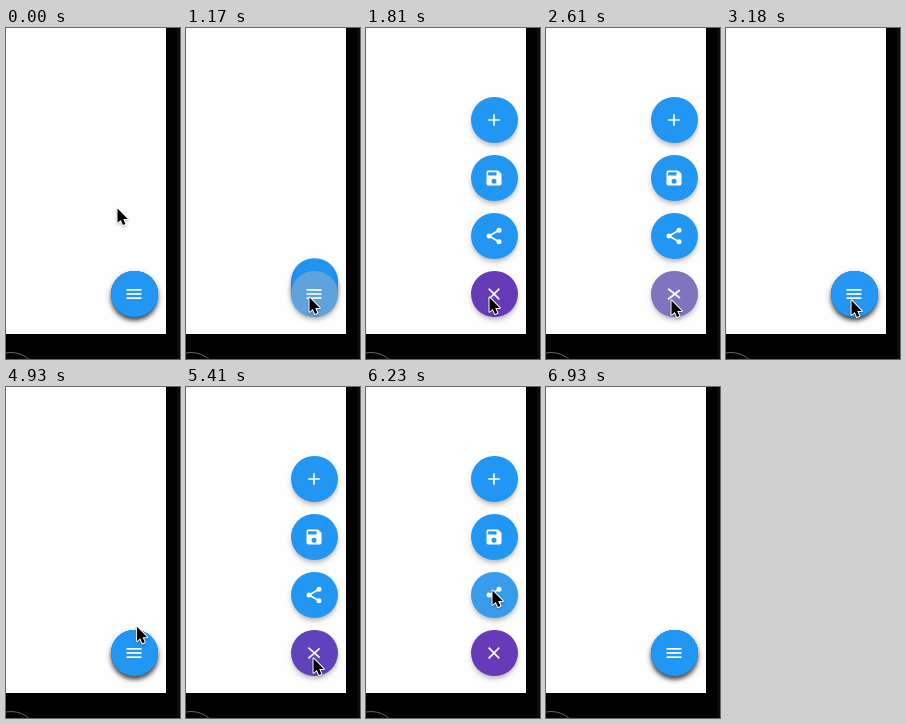
An HTML page for the animation above (7150 ms loop, 174 by 331 pixels).

```html
<!DOCTYPE html>
<html lang="en">
<head>
<meta charset="utf-8">
<title>Expanding action button</title>
<style>
  html, body { margin: 0; width: 100%; height: 100%; overflow: hidden; background: #000; }
  #stage { position: relative; width: 174px; height: 331px; overflow: hidden; background: #000; }
  #edge { position: absolute; left: 171px; top: 0; width: 3px; height: 331px; background: #0b0b0b; }
  #screen { position: absolute; left: 0; top: 0; width: 160px; height: 306px; background: #fefefe; overflow: hidden; }
  #home { position: absolute; left: -23.5px; top: 323.5px; width: 54px; height: 54px; border: 1.5px solid #666; border-radius: 50%; }
  .fab {
    position: absolute; left: 105.2px; top: 242.7px; width: 46.6px; height: 46.6px;
    border-radius: 50%; background: #2196f3;
    box-shadow: 0 3.5px 4px -1px rgba(0,0,0,.2), 0 3px 7px rgba(0,0,0,.1);
  }
  .ink { position: absolute; inset: 0; border-radius: 50%; background: #bcbcbc; opacity: 0; }
  .fab svg { position: absolute; left: 13px; top: 13px; width: 20px; height: 20px; fill: #fff; }
  #cursor { position: absolute; left: 0; top: 0; width: 16px; height: 22px; overflow: visible; filter: drop-shadow(0 1px 1px rgba(0,0,0,.3)); }
</style>
</head>
<body>
<div id="stage">
  <div id="edge"></div>
  <div id="home"></div>
  <div id="screen">
    <div class="fab"><div class="ink"></div>
      <svg viewBox="0 0 24 24"><path d="M11 5h2v6h6v2h-6v6h-2v-6H5v-2h6z"/></svg>
    </div>
    <div class="fab"><div class="ink"></div>
      <svg viewBox="0 0 24 24"><path fill-rule="evenodd" d="M17 3H5a2 2 0 0 0-2 2v14a2 2 0 0 0 2 2h14a2 2 0 0 0 2-2V7zM12 19a3 3 0 1 1 0-6 3 3 0 0 1 0 6zM15 9H5V5h10z"/></svg>
    </div>
    <div class="fab"><div class="ink"></div>
      <svg viewBox="0 0 24 24"><path d="M18 5L6 12l12 7" fill="none" stroke="#fff" stroke-width="2"/><circle cx="18" cy="5" r="3"/><circle cx="6" cy="12" r="3"/><circle cx="18" cy="19" r="3"/></svg>
    </div>
    <div class="fab"><div class="ink"></div>
      <svg viewBox="0 0 24 24"><rect class="bar" x="-9" y="-1" width="18" height="2"/><rect class="bar" x="-9" y="-1" width="18" height="2"/><rect class="bar" x="-9" y="-1" width="18" height="2"/></svg>
    </div>
  </div>
  <svg id="cursor"><path d="M.5 .5V14.8L3.8 11.9 6 17 8.4 16 6.2 10.9H10.8Z" fill="#000" stroke="#fff" stroke-width="2" stroke-linejoin="round" paint-order="stroke"/></svg>
</div>
<script>
const LOOP = 7150, TOGGLE = 330, PITCH = 58;
const SAVE = 1, SHARE = 2, MAIN = 3;
const fabs = [...document.querySelectorAll('.fab')];
const inks = [...document.querySelectorAll('.ink')];
const bars = [...document.querySelectorAll('.bar')];
const cursor = document.getElementById('cursor');

// Every tap toggles the menu.
const taps = [
  { at: 1160, fab: MAIN }, { at: 2560, fab: MAIN },
  { at: 3240, fab: MAIN }, { at: 4300, fab: SAVE },
  { at: 5110, fab: MAIN }, { at: 6270, fab: SHARE }
];
const glides = [
  { from: 350, to: 810, x: 123, y: 269 },
  { from: 1810, to: 2260, x: 125, y: 272 },
  { from: 3450, to: 4110, x: 123, y: 153 },
  { from: 4700, to: 5050, x: 127, y: 271 },
  { from: 5870, to: 6190, x: 126, y: 203 },
  { from: 6440, to: 6900, x: 131, y: 336 }
];

const progress = (t, from, to) => Math.min(1, Math.max(0, (t - from) / (to - from)));
const lerp = (a, b, k) => a + (b - a) * k;
const smooth = k => k * k * (3 - 2 * k);
const easeOut = k => 1 - (1 - k) ** 1.67;

const openness = t => taps.reduce((sum, { at }, i) =>
  sum + (i % 2 ? -1 : 1) * progress(t, at, at + TOGGLE), 0);

const inkOf = (fab, t) => taps.filter(tap => tap.fab === fab).reduce((sum, { at }) =>
  sum + .4 * (progress(t, at - 60, at) - progress(t, at + 40, at + 220)), 0);

// Glides ease in and out and bow slightly to the right.
function pointerAt(t) {
  let x = 111, y = 180;
  for (const g of glides) {
    const k = smooth(progress(t, g.from, g.to));
    x = lerp(x, g.x, k) + 6 * Math.sin(Math.PI * k);
    y = lerp(y, g.y, k);
  }
  return [x, y];
}

function draw(t) {
  const open = openness(t);
  const spread = easeOut(Math.min(open / .75, 1));

  fabs.forEach((fab, i) => {
    fab.style.transform = `translateY(${-PITCH * (MAIN - i) * spread}px)`;
    inks[i].style.opacity = inkOf(i, t);
  });
  fabs[MAIN].style.background =
    `rgb(${lerp(33, 103, open)}, ${lerp(150, 58, open)}, ${lerp(243, 183, open)})`;

  bars.forEach((bar, i) => {
    const side = i - 1;
    bar.setAttribute('transform',
      `translate(12 ${12 + side * 5 * (1 - open)}) rotate(${-side * 45 * open})`);
    if (!side) bar.setAttribute('opacity', Math.max(0, 1 - open * 2));
  });

  const [x, y] = pointerAt(t);
  cursor.style.transform = `translate(${x}px, ${y}px)`;
}

const start = performance.now();
function tick() {
  draw((performance.now() - start) % LOOP);
  requestAnimationFrame(tick);
}
tick();
</script>
</body>
</html>
```
